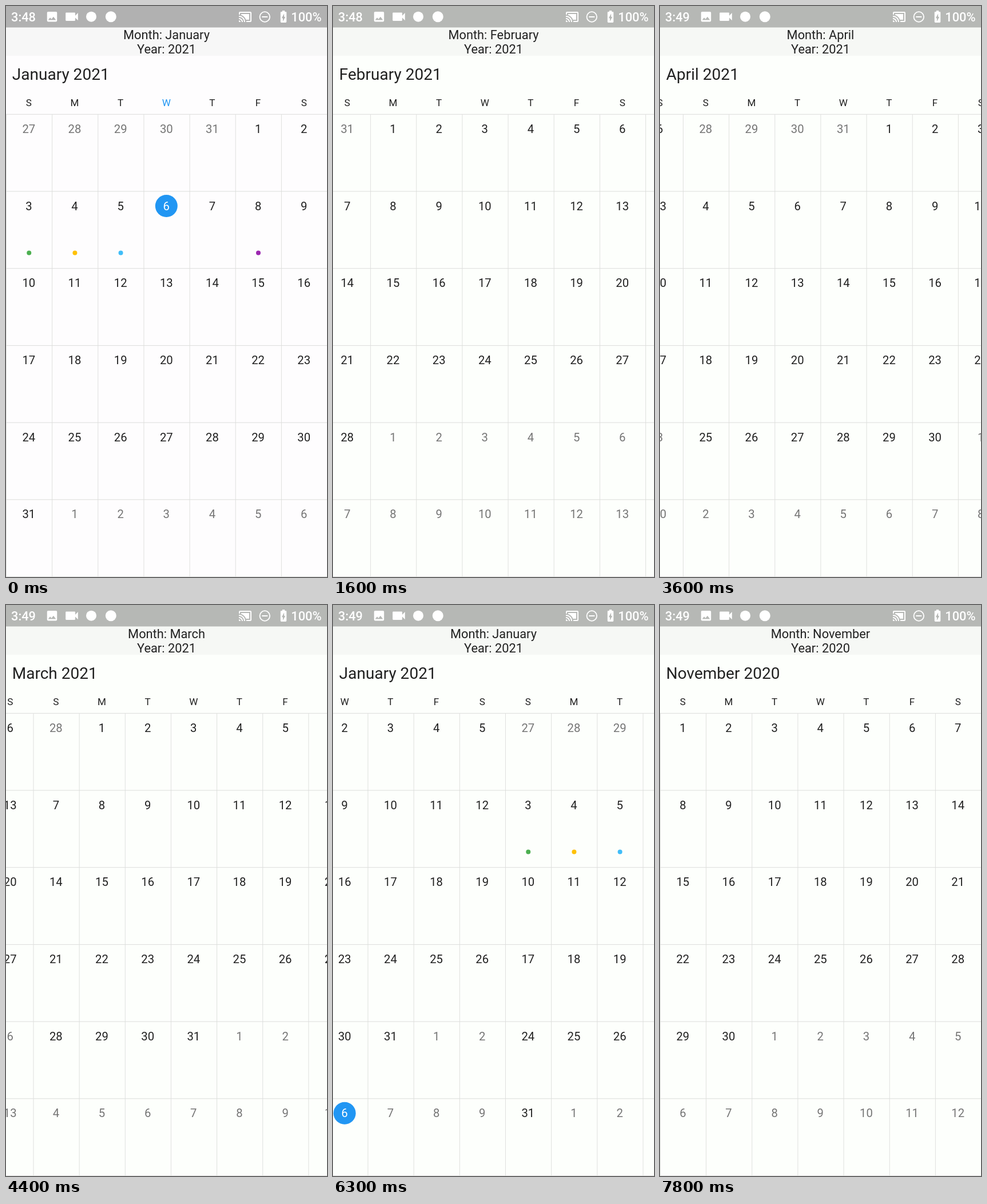
Animation, 561 px wide and 998 px high, one loop 8 s. Source, as an HTML page with a canvas:

```html
<!DOCTYPE html>
<html lang="en">
<head>
<meta charset="utf-8">
<style>
  html, body { margin: 0; width: 100%; height: 100%; overflow: hidden; }
  canvas { display: block; }
</style>
</head>
<body>
<canvas width="561" height="998"></canvas>
<script>
const ctx = document.querySelector('canvas').getContext('2d');
const W = 561, COL = W / 7, TOP = 189.3, ROW = 134.7;
const LOOP = 8000, STEP = 100, SETTLE = 250;
const INK = '#212121', FADED = '#757575', BLUE = '#2196f3';
const EVENTS = { 3: '#4caf50', 4: '#ffc107', 5: '#40bdf8', 8: '#9c27b0' };

// Each swipe: start time, direction, first drag offset, release delay, release offset.
const SWIPES = [
  [800, 1, 40, 50, 100],
  [1600, 1, 15, 240, 200],
  [2400, 1, 24, 150, 106],
  [3600, -1, 40, 50, 100],
  [4400, -1, 47.5, 150, 190],
  [5300, -1, 25, 155, 272],
  [6100, -1, 41, 300, 431],
  [7500, -1, 40, 50, 100],
];

const ICONS = {
  image: 'M21 19V5c0-1.1-.9-2-2-2H5c-1.1 0-2 .9-2 2v14c0 1.1.9 2 2 2h14c1.1 0 2-.9 2-2zM8.5 13.5l2.5 3.01L14.5 12l4.5 6H5z',
  video: 'M17 10.5V7c0-.55-.45-1-1-1H4c-.55 0-1 .45-1 1v10c0 .55.45 1 1 1h12c.55 0 1-.45 1-1v-3.5l4 4v-11z',
  cast: 'M21 3H3c-1.1 0-2 .9-2 2v3h2V5h18v14h-7v2h7c1.1 0 2-.9 2-2V5c0-1.1-.9-2-2-2zM1 18v3h3c0-1.66-1.34-3-3-3z' +
    'm0-4v2c2.76 0 5 2.24 5 5h2c0-3.87-3.13-7-7-7zm0-4v2c4.97 0 9 4.03 9 9h2c0-6.08-4.93-11-11-11z' +
    'M19 7H5v1.63c3.96 1.28 7.09 4.41 8.37 8.37H19z',
  battery: 'M15.67 4H14V2h-4v2H8.33C7.6 4 7 4.6 7 5.33v15.33C7 21.4 7.6 22 8.33 22h7.33c.74 0 1.34-.6 1.34-1.33V5.33' +
    'C17 4.6 16.4 4 15.67 4zM11 20v-5.5H9L13 7v5.5h2z',
};

function rect(x, y, w, h, color) {
  ctx.fillStyle = color;
  ctx.fillRect(x, y, w, h);
}

function disc(x, y, r, color) {
  ctx.fillStyle = color;
  ctx.beginPath();
  ctx.arc(x, y, r, 0, Math.PI * 2);
  ctx.fill();
}

function text(str, x, y, size, color = INK, align = 'center', weight = 400) {
  ctx.font = `${weight} ${size}px Roboto, sans-serif`;
  ctx.textAlign = align;
  ctx.fillStyle = color;
  ctx.fillText(str, x, y);
}

function icon(name, x, y, scale) {
  ctx.save();
  ctx.translate(x, y);
  ctx.scale(scale, scale);
  ctx.translate(-12, -12);
  ctx.fillStyle = '#fff';
  ctx.fill(new Path2D(ICONS[name]), 'evenodd');
  ctx.restore();
}

function stateAt(t) {
  const state = { month: 0, title: 0, label: 0, dir: 0, offset: 0 };
  for (const [start, dir, first, delay, release] of SWIPES) {
    const dt = t - start;
    if (dt < 0) break;
    if (dt >= delay) state.title += dir;
    if (dt >= delay + SETTLE) {
      state.month += dir;
      state.label += dir;
      continue;
    }
    state.dir = dir;
    state.offset = dt < delay
      ? first + (release - first) * dt / delay
      : release + (W - release) * (dt - delay) / SETTLE;
  }
  return state;
}

function drawPage(month, left) {
  ctx.save();
  ctx.translate(left, 0);
  for (let i = 0; i < 7; i++) rect(i * COL, TOP, 1, 998 - TOP, '#dfe0de');
  for (let i = 0; i < 7; i++) rect(0, TOP - .5 + i * ROW, W, 1, '#dcdddb');

  const shown = new Date(2021, month, 1);
  const lead = shown.getDay();
  for (let col = 0; col < 7; col++) {
    const x = (col + .5) * COL - .2;
    text('SMTWTFS'[col], x, 174.7, 17.1, month === 0 && col === 3 ? BLUE : INK);
    for (let row = 0; row < 6; row++) {
      const date = new Date(2021, month, 1 - lead + row * 7 + col);
      const day = date.getDate();
      const y = TOP + 25.3 + row * ROW;
      const inside = date.getMonth() === shown.getMonth();
      const today = date.getFullYear() === 2021 && date.getMonth() === 0 && day === 6;
      if (today) disc(x, y + .2, 19.5, BLUE);
      text(day, x, y + 7.3, 20.3, today ? '#fff' : inside ? INK : FADED);
      if (month === 0 && inside && EVENTS[day]) disc(x + .4, y + 82.3, 4, EVENTS[day]);
    }
  }
  ctx.restore();
}

function drawStatus(clock, color) {
  rect(0, 0, W, 37.5, color);
  text(clock, 9, 27, 21.8, '#fff', 'left', 500);
  icon('image', 80.5, 18.7, .97);
  icon('video', 115, 18.7, 1.2);
  disc(149, 18.7, 9, '#fff');
  disc(183.3, 18.7, 9.5, '#fff');
  icon('cast', 418, 19, 1);
  ctx.strokeStyle = '#fff';
  ctx.lineWidth = 1.8;
  ctx.beginPath();
  ctx.arc(452.3, 19, 8.8, 0, Math.PI * 2);
  ctx.stroke();
  rect(447.3, 18, 10, 2, '#fff');
  icon('battery', 485, 18.5, 1.05);
  text('100%', 551.5, 27, 21.8, '#fff', 'right', 500);
}

function draw(t) {
  const { month, title, label, dir, offset } = stateAt(t);
  const fresh = t < 800;
  const name = m => new Date(2021, m, 1).toLocaleString('en-US', { month: 'long' });
  const year = m => new Date(2021, m, 1).getFullYear();

  rect(0, 0, W, 998, fresh ? '#fefdfe' : '#fdfffc');
  drawPage(month, -dir * offset);
  if (dir) drawPage(month + dir, dir * (W - offset));
  rect(0, 37.5, W, 49.5, fresh ? '#f7f7f7' : '#f6f8f5');
  text(`Month: ${name(label)}`, 280.5, 57.7, 21.8);
  text(`Year: ${year(label)}`, 280.5, 82.8, 21.8);
  text(`${name(title)} ${year(title)}`, 10.7, 129, 28.05, INK, 'left');
  drawStatus(t < 1800 ? '3:48' : '3:49', fresh ? '#b1b1b1' : '#b6b8b5');
}

function tick() {
  const t = performance.now() % LOOP;
  draw(Math.floor(t / STEP) * STEP);
  requestAnimationFrame(tick);
}
tick();
</script>
</body>
</html>
```
